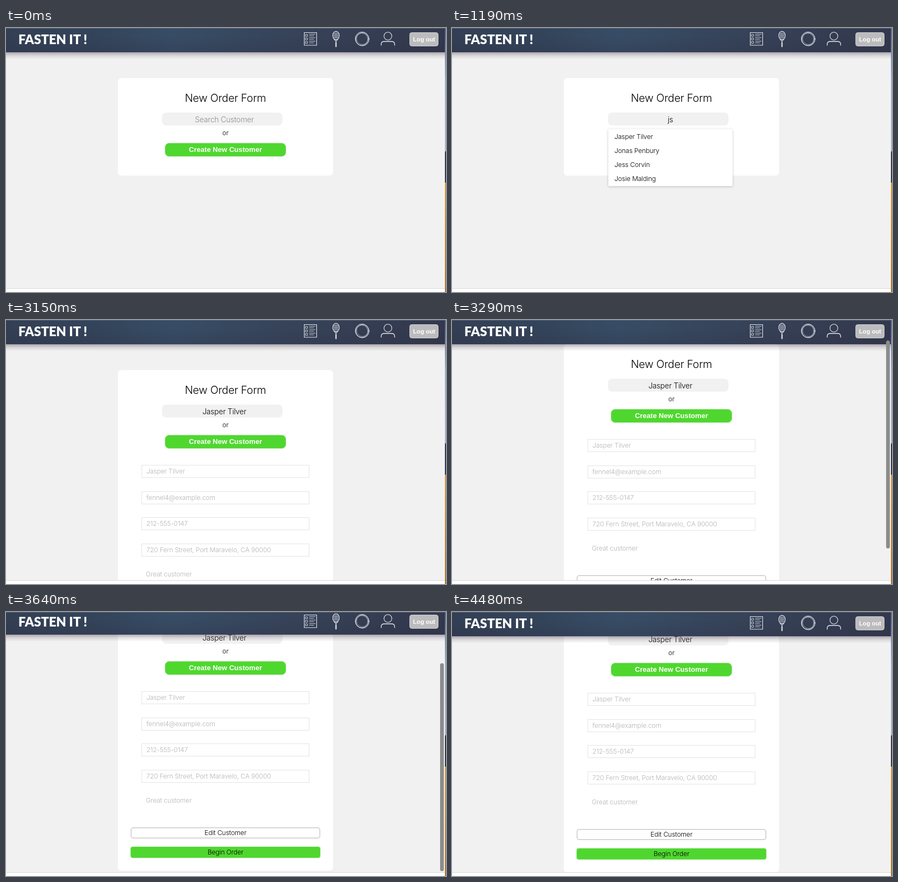
These frames come from a looping animation (818 px wide and 490 px high, 4550 ms). An HTML page:

```html
<!DOCTYPE html>
<html lang="en">
<head>
<meta charset="utf-8">
<title>New order</title>
<style>
  html, body { margin: 0; width: 100%; height: 100%; overflow: hidden; background: #f1f1f1; }
  svg { display: block; width: 818px; height: 490px; }
  text { font: 300 12.2px Inter, "Liberation Sans", sans-serif; letter-spacing: -.012em; fill: #000; white-space: pre; }
  .mid { text-anchor: middle; }
  .title { font-size: 20px; }
  .entry { font-size: 13.9px; }
  .strong { font: 700 13.1px "Liberation Sans", Arial, sans-serif; letter-spacing: 0; fill: #fff; }
  .brand { font: 900 24px Lato, sans-serif; letter-spacing: -.1px; fill: #fff; }
  .hint { fill: #8c8c8c; }
  .field text, .note { fill: #b4b4b4; }
  .field rect { fill: #fff; stroke: #e4e4e4; }
  .green { fill: #4fd72f; stroke: #bdeeb2; }
  .icon { fill: none; stroke: #e6eaf0; stroke-width: 1.1; stroke-linecap: round; }
  .sheet { fill: #fff; filter: drop-shadow(0 1px 2px rgba(0, 0, 0, .22)); }
</style>
</head>
<body>
<svg viewBox="0 0 818 490">
  <defs>
    <linearGradient id="bar">
      <stop offset="0" stop-color="#333f54"/>
      <stop offset=".2" stop-color="#33445a"/>
      <stop offset=".38" stop-color="#374d65"/>
      <stop offset=".65" stop-color="#364359"/>
      <stop offset="1" stop-color="#33384c"/>
    </linearGradient>
    <linearGradient id="dusk" x2="0" y2="1">
      <stop offset=".4" stop-color="#2e2e44" stop-opacity="0"/>
      <stop offset="1" stop-color="#2e2e44" stop-opacity=".28"/>
    </linearGradient>
    <linearGradient id="shade" x2="0" y2="1">
      <stop offset="0" stop-color="#5c5062" stop-opacity=".48"/>
      <stop offset=".45" stop-color="#6c6270" stop-opacity=".2"/>
      <stop offset="1" stop-color="#777" stop-opacity="0"/>
    </linearGradient>
    <linearGradient id="desk" x2="0" y2="1">
      <stop offset="0" stop-color="#5b6c93"/>
      <stop offset=".2" stop-color="#9daccc"/>
      <stop offset=".465" stop-color="#a9b3cf"/>
      <stop offset=".47" stop-color="#2f3548"/>
      <stop offset=".585" stop-color="#2f3548"/>
      <stop offset=".586" stop-color="#d39a3c"/>
      <stop offset="1" stop-color="#a8722c"/>
    </linearGradient>
  </defs>

  <rect width="818" height="490" fill="#f1f1f1"/>

  <g id="page">
    <rect id="card" x="208" y="93" width="400" height="181" rx="6" fill="#fff"/>
    <text class="title mid" x="408" y="137">New Order Form</text>
    <rect x="290" y="157" width="224" height="24" rx="8" fill="#f1f1f1"/>
    <text id="entry" class="entry mid" x="406" y="175"></text>
    <rect id="caret" y="161" width="1" height="17" fill="#222"/>
    <text class="mid" x="408" y="199">or</text>
    <rect class="green" x="295.5" y="213.5" width="225" height="25" rx="8"/>
    <text class="strong mid" x="408" y="230">Create New Customer</text>

    <g id="form">
      <g id="fields"></g>
      <text class="note" x="260" y="476">Great customer</text>
      <rect x="232.5" y="522.5" width="351" height="19" rx="3.5" fill="#fff" stroke="#b4b4b4"/>
      <text class="mid" x="408" y="536">Edit Customer</text>
      <rect class="green" x="231.5" y="557.5" width="353" height="21" rx="4"/>
      <text class="mid" x="408" y="572">Begin Order</text>
    </g>

    <g id="menu">
      <rect id="sheet" class="sheet" x="290.5" y="187.5" width="231" rx="2"/>
      <rect id="hover" x="289" y="187" width="233" height="27" rx="2" fill="#f1f1f1"/>
      <g id="names"></g>
    </g>
  </g>

  <g id="header">
    <rect y="45" width="816" height="13" fill="url(#shade)"/>
    <rect y="-6" width="816" height="51" fill="url(#bar)"/>
    <rect y="-6" width="816" height="51" fill="url(#dusk)"/>
    <text class="brand" x="23" y="30">FASTEN IT !</text>
    <g class="icon">
      <path d="M554.5 8.5h23v23.5h-23z"/>
      <path d="M557 12h3.500v3.500h-3.500zM557 18.500h3.500v3.500h-3.500zM557 25h3.500v3.500h-3.500zM564 11.500h11M564 14.500h8M564 18h11M564 21h8M564 24.500h11M564 27.500h8" stroke-width=".8"/>
      <ellipse cx="613.5" cy="14" rx="6" ry="8"/>
      <path d="M611 7v13M613.5 6v16M616 7v13M608 11h11M607.5 14h12M608 17h11" stroke-width=".6"/>
      <path d="M610 21l3.5 4 3.5-4M613.5 25v2"/>
      <path d="M613.5 27v7.5" stroke-width="2.2"/>
      <circle cx="662" cy="20" r="12.7" stroke-width=".9"/>
      <circle cx="662.8" cy="20.8" r="12.4" stroke-width=".6"/>
      <circle cx="661.5" cy="20.8" r="11.2" stroke-width=".6"/>
      <circle cx="662.6" cy="19.7" r="10.8" stroke-width=".5"/>
      <circle cx="710" cy="15" r="7.3"/>
      <path d="M697.5 32v-2q0-5 6-5h13q6 0 6 5v2" stroke-width="1.3"/>
    </g>
    <rect x="750.5" y="8.5" width="53" height="25" rx="4" fill="#bcbcbe" stroke="#d0d0d2"/>
    <text class="strong mid" x="777.3" y="25" style="font-size:11.2px">Log out</text>
  </g>

  <rect id="thumb" x="807" width="7" height="386" rx="3.5" fill="#8c8c8c"/>
  <rect width="816" height="1" fill="#59657a"/>
  <rect y="484" width="816" height="6" fill="#fefefe"/>
  <rect y="483" width="816" height="1" fill="#d9d9d9"/>
  <rect x="816" width="2" height="490" fill="url(#desk)"/>
</svg>

<script>
const LOOP = 4550, STEP = 70;
const $ = id => document.getElementById(id);
const clamp = v => Math.min(1, Math.max(0, v));
const easeOut = p => 1 - (1 - p) ** 3;
const smooth = p => p * p * (3 - 2 * p);
const show = (el, on) => { el.style.display = on ? '' : 'none'; };

const customer = 'Jasper Tilver';
const names = [customer, 'Jonas Penbury', 'Jess Corvin', 'Josie Malding', 'Jethro Dunley', 'Jean Marrow'];
$('names').innerHTML = names.map((n, i) => `<text x="302" y="${206 + 26 * i}">${n}</text>`).join('');

const details = [customer, 'fennel4@example.com', '212-555-0147', '720 Fern Street, Port Maravelo, CA 90000'];
$('fields').innerHTML = details.map((d, i) => {
  const y = Math.round(269 + 48.7 * i);
  return `<g class="field"><rect x="252.5" y="${y + .5}" width="311" height="23"/><text x="261" y="${y + 16}">${d}</text></g>`;
}).join('');

function entryText(t) {
  if (t < 70) return 'Search Customer';
  if (t < 700) return 'j';
  return t < 2240 ? 'js' : customer;
}

// Rubber-band distance past the end of the page
function bounce(t) {
  if (t < 4060) return 5 * clamp((t - 3500) / 210);
  return 4 * clamp((4480 - t) / 420) ** 2;
}

function drawMenu(t) {
  const open = easeOut(clamp(t / 280));
  const fade = t < 2240 ? 1 : clamp((2380 - t) / 210);
  const count = t < 700 ? 6 : 4;
  const menu = $('menu');
  show(menu, t >= 70 && t < 2380);
  menu.setAttribute('opacity', open * fade);
  menu.setAttribute('transform', `translate(290 187) scale(${open}) translate(-290 -187)`);
  $('sheet').setAttribute('height', 26 * count + 2);
  $('hover').setAttribute('opacity', easeOut(clamp((t - 1680) / 420)));
  [...$('names').children].forEach((el, i) => show(el, i < count));
}

function draw(now) {
  const t = Math.floor(now % LOOP / STEP) * STEP;

  const entry = $('entry');
  entry.textContent = entryText(t);
  entry.classList.toggle('hint', t < 70);
  show($('caret'), (t >= 70 && t < 1190) || (t >= 1750 && t < 2100));
  $('caret').setAttribute('x', t < 700 ? 408 : 411);

  drawMenu(t);

  const filled = t >= 2240;
  show($('form'), filled);
  $('card').setAttribute('height', filled ? 509 : 181);

  const scroll = 119 * smooth(clamp((t - 3150) / 320));
  const extra = Math.round(bounce(t));
  $('page').setAttribute('transform', `translate(0 ${-Math.round(scroll) - extra})`);
  $('header').setAttribute('transform', `translate(0 ${-extra})`);
  $('thumb').setAttribute('y', Math.round(scroll * .795));
  $('thumb').setAttribute('opacity', t > 3150 ? clamp((4410 - t) / 280) : 0);
}

function tick(now) {
  draw(now);
  requestAnimationFrame(tick);
}
draw(0);
requestAnimationFrame(tick);
</script>
</body>
</html>
```
